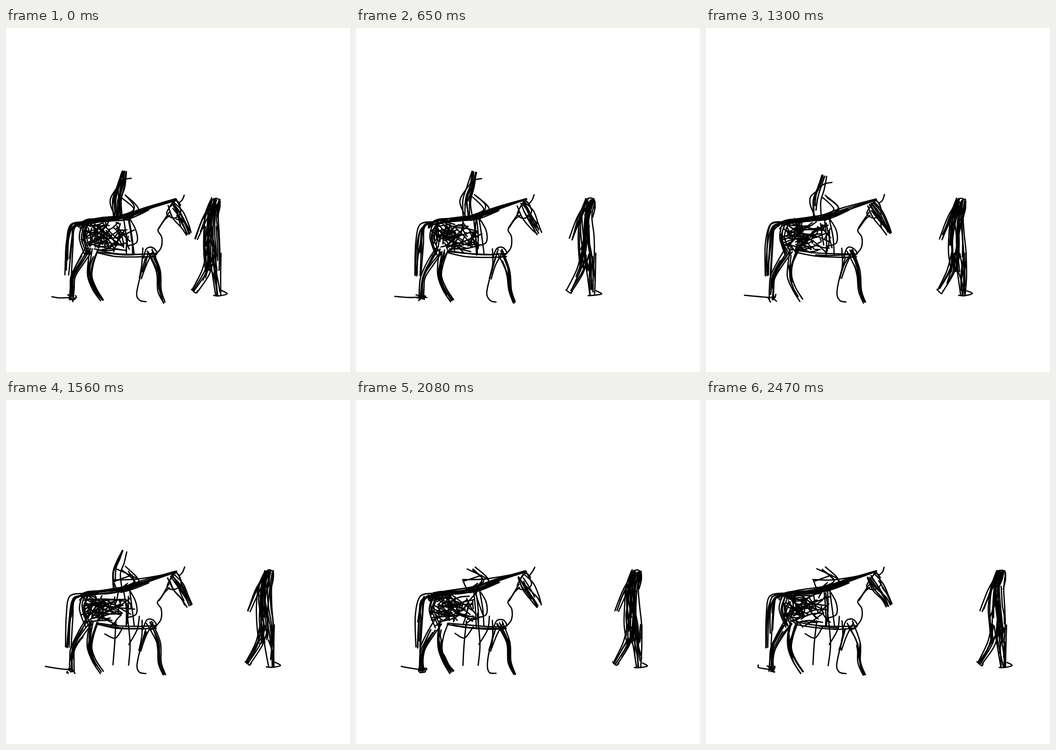
An HTML page with a canvas that plays this animation: 748 by 748 pixels, repeating every 2600 ms.

```html
<!DOCTYPE html>
<html lang="en">
<head>
<meta charset="utf-8">
<title>Horse and walker sketch</title>
<style>
html, body { margin: 0; width: 100%; height: 100%; overflow: hidden; background: #fff; }
canvas { display: block; width: 748px; height: 748px; }
</style>
</head>
<body>
<canvas id="stage" width="748" height="748"></canvas>
<script>
const ctx = document.getElementById('stage').getContext('2d');
const STEP = 130, STEPS = 20;

let seed = 1;
function rnd() {
  seed = (seed + 0x6D2B79F5) | 0;
  let t = Math.imul(seed ^ seed >>> 15, 1 | seed);
  t = t + Math.imul(t ^ t >>> 7, 61 | t) ^ t;
  return ((t ^ t >>> 14) >>> 0) / 4294967296;
}
const between = (a, b) => a + (b - a) * rnd();
const mix = (a, b, u) => a + (b - a) * u;
const parse = text => text.split(' ').map(p => p.split(',').map(Number));

// Smooth stroke through the points, each moved by up to `wobble`
function pen(points, wobble = 1) {
  const p = points.map(([x, y]) => [x + between(-wobble, wobble), y + between(-wobble, wobble)]);
  ctx.beginPath();
  ctx.moveTo(...p[0]);
  for (let i = 0; i < p.length - 1; i++) {
    const a = p[i - 1] || p[i], b = p[i], c = p[i + 1], d = p[i + 2] || c;
    ctx.bezierCurveTo(b[0] + (c[0] - a[0]) / 6, b[1] + (c[1] - a[1]) / 6,
      c[0] - (d[0] - b[0]) / 6, c[1] - (d[1] - b[1]) / 6, ...c);
  }
  ctx.stroke();
}
const line = text => pen(parse(text));

// Bundle of strokes along a spine of "x,y,halfWidth" points:
// first both edges, then loose strokes crossing from side to side
function hair(count, text) {
  const spine = parse(text), last = spine.length - 1;
  const at = (t, side) => {
    const i = Math.min(last - 1, Math.floor(t * last)), f = t * last - i;
    const [p, q] = [spine[i], spine[i + 1]];
    const before = spine[Math.max(0, Math.round(t * last) - 1)];
    const after = spine[Math.min(last, Math.round(t * last) + 1)];
    const dx = after[0] - before[0], dy = after[1] - before[1];
    const k = mix(p[2], q[2], f) * side / Math.hypot(dx, dy);
    return [mix(p[0], q[0], f) - dy * k, mix(p[1], q[1], f) + dx * k];
  };
  for (let n = 0; n < count; n++) {
    const edge = n < 2, u = edge ? 1 - 2 * n : between(-1, 1), v = edge ? u : between(-1, 1);
    const from = edge ? 0 : Math.max(0, between(-.3, .4));
    const to = edge ? 1 : Math.min(1, between(.6, 1.3));
    const path = [];
    for (let j = 0; j <= last; j++) path.push(at(mix(from, to, j / last), mix(u, v, j / last)));
    pen(path, 1.3);
  }
}

// Random point in a rounded box
function inside(x, y, rx, ry) {
  const a = between(0, 2 * Math.PI), r = Math.sqrt(rnd());
  const bulge = c => Math.sign(c) * Math.abs(c) ** .65 * r;
  return [x + rx * bulge(Math.cos(a)), y + ry * bulge(Math.sin(a))];
}
function hatch(count, reach, ...box) {
  for (let n = 0; n < count; n++) {
    const p = inside(...box), far = inside(...box);
    const q = [mix(p[0], far[0], reach), mix(p[1], far[1], reach)];
    pen([p, [(p[0] + q[0]) / 2, (p[1] + q[1]) / 2], q], 4);
  }
}

function drawHorse(step) {
  // back, neck, mane
  hair(4, '158,433,3 178,420,3 235,416,3 300,394,3 370,373,1');
  hair(6, '170,424,4 210,417,4 262,411,5 310,394,3');
  line('250,418 300,398 368,373');
  // head, ear, eye
  hair(10, '358,382,8 374,406,13 389,430,9 398,447,6');
  line('346,381 367,374 379,386');
  line('377,381 383,374 388,363');
  line('364,378 350,404 366,413 381,400 371,376 359,388');
  // throat, chest, belly
  line('355,400 338,426 330,440 338,455 337,478 322,496');
  line('356,408 345,418 333,436');
  line('298,500 306,479 320,478 328,490 314,500');
  hair(3, '200,486,2 240,493,3 290,495,3 326,494,3');
  // forelegs
  hair(6, '312,484,6 331,528,4 334,570,3 344,597,2');
  hair(3, '308,482,12 300,515,4 292,545,2');
  line('303,497 290,545 285,578 291,592 304,595');
  // tail and hind legs
  hair(8, '168,423,2 144,431,6 138,470,8 135,538,6');
  hair(7, '180,482,8 163,508,7 145,540,5 143,565,4 142,590,5');
  hair(7, '192,482,9 184,510,6 182,540,4 192,568,4 208,592,4');
  hatch(4, 1, 143, 587, 11, 7);
  // haunch and body
  hair(5, '174,423,6 165,455,5 178,492,6');
  hatch(30, .8, 195, 448, 35, 32);
  hatch(42, .75, 219, 454, 59, 39);
  // ground line
  pen([[82 + (step - 8) ** 2 * .27, 585 - step * .42], [115, 586 - step * .2], [140, 586]]);
}

// The rider sinks out of the saddle and ends up standing behind the horse
function drawRider(step) {
  const top = 312 + 54 * Math.min(1, step / 18) ** 3;
  const strokes = Math.max(0, Math.round(14 - step * .85));
  hair(strokes, `257,${top},5 250,${mix(top, 376, .5)},8 241,376,9 243,412,9`);
  hair(3, '256,366,4 284,393,5 258,412,6');
  hair(4, '262,412,6 268,455,7 270,492,9');
  line('262,404 282,438 284,466 264,474');
  if (step < 12) {
    pen([[273, top + 14], [258, top + 17], [246, top + 26]]);
    pen([[245, top + 30], [228, 367], [227, 385], [238, 412]]);
  } else {
    line('232,391 280,390 345,380');
    line('235,394 274,381');
    line('233,392 243,412 264,398');
    line('241,367 284,388 287,400 262,411');
    line('240,480 236,530 232,576');
    line('264,465 270,530 266,577');
    line('215,508 237,518 254,494');
    line('290,470 286,500 268,532');
  }
}

function drawWalker(step) {
  ctx.save();
  ctx.translate(455 + 9.85 * step + 4 * Math.sin(step / STEPS * 2 * Math.PI), 0);
  // head and body
  line('-12,394 -9,376 1,370 10,375 9,392');
  hair(7, '1,371,9 0,388,11 -5,408,11');
  hair(20, '1,374,10 -8,407,14 -9,450,17 -7,490,18 -6,528,14');
  hair(4, '-8,385,3 -24,415,4 -42,459,3');
  // trailing and leading legs
  hair(6, '-10,490,9 -21,530,8 -45,573,5');
  line('-51,569 -42,577 -38,572');
  hair(8, '-1,490,13 3,540,9 6,581,5');
  line('-4,581 8,582 25,578 13,571');
  ctx.restore();
}

function drawStep(step) {
  seed = 9001 + step * 7919;
  ctx.fillStyle = '#fff';
  ctx.fillRect(0, 0, 748, 748);
  ctx.strokeStyle = '#000';
  ctx.lineWidth = 2.8;
  ctx.lineCap = ctx.lineJoin = 'round';
  drawHorse(step);
  drawRider(step);
  drawWalker(step);
}

let shown = -1;
function tick() {
  const step = Math.floor(performance.now() / STEP) % STEPS;
  if (step !== shown) drawStep(shown = step);
  requestAnimationFrame(tick);
}
tick();
</script>
</body>
</html>
```
